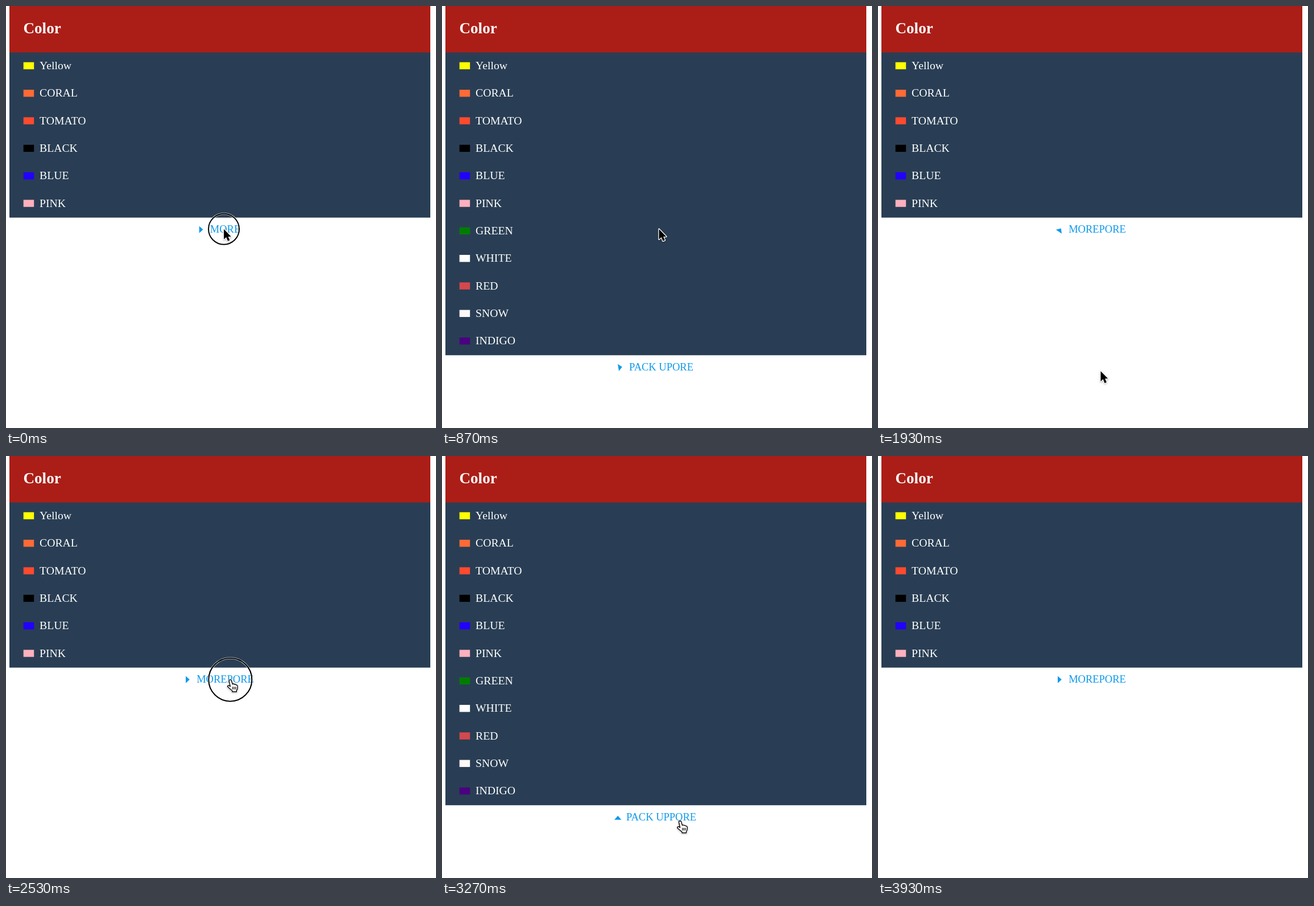
Write an HTML page with a canvas that moves like this. It is 756 by 741 pixels and loops after 3.99 s.

```html
<!DOCTYPE html>
<html lang="en">
<head>
<meta charset="utf-8">
<title>Color list</title>
<style>
  html, body { margin: 0; width: 100%; height: 100%; overflow: hidden; background: #fff; }
  canvas { display: block; }
</style>
</head>
<body>
<canvas width="756" height="741"></canvas>
<script>
const ctx = document.querySelector('canvas').getContext('2d');
const LOOP = 3990, FPS = 15;
const SERIF = '"Liberation Serif", "Times New Roman", serif';
const ROW = 48.33, PANEL_TOP = 81.6, LINK = '#0d99ea';
const CLOSED_Y = 391.7, OPEN_Y = 640.5;

const colors = [
  ['Yellow', '#ff0'], ['CORAL', '#ff6a36'], ['TOMATO', '#ff4a2f'], ['BLACK', '#000'],
  ['BLUE', '#20f'], ['PINK', '#ffb0be'], ['GREEN', '#007d00'], ['WHITE', '#fff'],
  ['RED', '#d4484d'], ['SNOW', '#fff9f8'], ['INDIGO', '#4a0080']
];

// Every click toggles the list; hold is how long the button stays down before that.
const clicks = [
  { time: 0, hold: 0, x: 383, y: CLOSED_Y, label: 'MORE' },
  { time: 860, hold: 130, x: 381.5, y: CLOSED_Y, label: 'PACK UPORE' },
  { time: 1860, hold: 65, x: 391.5, y: OPEN_Y, label: 'MOREPORE' },
  { time: 2590, hold: 65, x: 394.3, y: CLOSED_Y + 1, label: 'PACK UPPORE' },
  { time: 3590, hold: 65, x: 418.5, y: OPEN_Y, label: 'MOREPORE' }
];
const exit = { time: 4100, x: 430, y: 800 };

const arrow = new Path2D('M0 0V18L4.2 14.2L7 21L10.4 19.6L7.6 13.2H12.8Z');
const hand = new Path2D('M-1 .5Q1-.5 2 1.6L4 8Q6 6.6 7.4 8.4Q9.4 7.5 10.4 9.5Q12.6 9 12.8 11.5V14' +
  'Q12.8 17 11 19V21.3H3.5V19.6Q-1 16-4.8 12.4Q-4.8 10-2.3 10.3L0 12L-2 3Q-2.5 1-1 .5Z');
const knuckles = new Path2D('M4.3 12.5V17M6.9 12.5V17M9.5 12.5V17');
const marker = new Path2D('M-4.4-6.2L2.4 0L-4.4 6.2Z');

const clamp = p => Math.max(0, Math.min(1, p));
const smooth = p => p * p * (3 - 2 * p);

// The pointer rests after a click, then glides to the next one in a sagging curve.
function pointerAt(t, from, to) {
  const p = clamp((t - from.time - 70) / (.6 * (to.time - from.time)));
  const s = smooth(p);
  return [from.x + (to.x - from.x) * s, from.y + (to.y - from.y) * s + 28 * Math.sin(p * Math.PI)];
}

function rect(color, x, y, w, h) {
  ctx.fillStyle = color;
  ctx.fillRect(x, y, w, h);
}

function text(string, x, y, size, color = '#fff', weight = '') {
  ctx.font = `${weight} ${size}px ${SERIF}`;
  ctx.fillStyle = color;
  ctx.fillText(string, x, y);
}

function stroke(color, width, path) {
  ctx.strokeStyle = color;
  ctx.lineWidth = width;
  path ? ctx.stroke(path) : ctx.stroke();
}

function drawList(count) {
  rect('#293e54', 6, 0, 740, PANEL_TOP + count * ROW);
  rect('#ab1e17', 6, 0, 740, PANEL_TOP);
  text('Color', 30.5, 48, 27.1, '#fff', 'bold');
  colors.slice(0, count).forEach(([name, color], i) => {
    const y = 104.9 + i * ROW;
    rect(color, 30.7, y - 6.2, 18.5, 12.4);
    text(name, 59, y + 6, 19.73);
  });
}

function drawLink(label, y, turn) {
  ctx.textAlign = 'center';
  text(label, 385.5, y + 6.2, 18.5, LINK);
  ctx.textAlign = 'left';
  ctx.save();
  ctx.translate(385.5 - ctx.measureText(label).width / 2 - 14.7, y + .6);
  ctx.rotate(-turn * Math.PI / 2);
  ctx.fill(marker);
  ctx.restore();
}

function drawRing(x, y, radius) {
  ctx.beginPath();
  ctx.arc(x, y, radius, 0, 7);
  stroke('rgba(255,255,255,.75)', 3.6);
  stroke('#000', 2);
}

function drawPointer(x, y, isHand) {
  const shape = isHand ? hand : arrow;
  ctx.save();
  ctx.translate(x, y);
  ctx.lineJoin = 'round';
  ctx.shadowColor = 'rgba(0,0,0,.3)';
  ctx.shadowBlur = 3;
  ctx.shadowOffsetY = 1;
  stroke('#fff', 2.6, shape);
  ctx.shadowColor = 'transparent';
  ctx.fillStyle = isHand ? '#fff' : '#000';
  ctx.fill(shape);
  if (isHand) {
    stroke('#000', 1.4, hand);
    stroke('#000', 1.2, knuckles);
  }
  ctx.restore();
}

function draw(t) {
  const index = clicks.findLastIndex(click => t >= click.time);
  const last = clicks[index], next = clicks[index + 1] || exit;
  const open = index % 2;
  const count = open ? 11 : 6;
  const linkY = 102 + count * ROW;
  const p = index ? smooth(clamp((t - last.time + 54) / 300)) : 1;
  const [x, y] = pointerAt(t, last, next);

  rect('#fff', 0, 0, 756, 741);
  drawList(count);
  drawLink(last.label, linkY, open ? p : 1 - p);
  if (t < 60) drawRing(x, y, 27);
  if (t >= next.time - next.hold) drawRing(x, y, 38);
  drawPointer(x, y, t > 60 && Math.abs(y - linkY) < 14);
}

// The picture advances in steps of 1/15 s.
function tick() {
  const t = performance.now() % LOOP;
  draw(Math.floor((t + 4) * FPS / 1000) * 1000 / FPS);
  requestAnimationFrame(tick);
}
tick();
</script>
</body>
</html>
```
